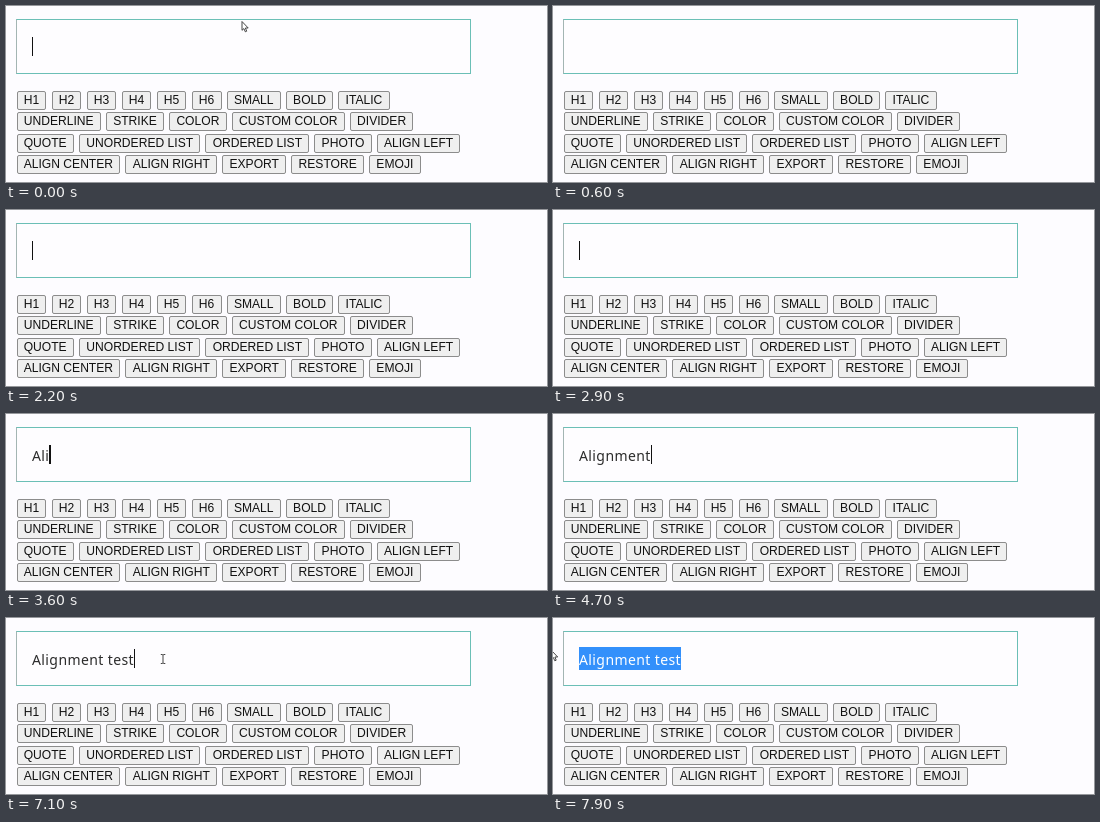
These frames come from a looping animation (541 px wide and 176 px high, 8 s). An HTML page:

```html
<!DOCTYPE html>
<html lang="en">
<head>
<meta charset="utf-8">
<title>Text editor</title>
<style>
  html, body { margin: 0; width: 100%; height: 100%; overflow: hidden; background: #fdfcff; }
  #stage { position: relative; width: 541px; height: 176px; overflow: hidden; }
  #stage > * { position: absolute; }
  #box { left: 10px; top: 13px; width: 453px; height: 53px; border: 1px solid #6bbfb6;
    border-left-color: #a3b5b3; background: #fefdff; }
  #line { left: 26px; top: 32px; color: #2c2c2c; white-space: pre;
    font: 14px/19px "Noto Sans", sans-serif; letter-spacing: .4px; }
  #mark { padding: 3px 0 1px; background: #3390fb; color: #fff; }
  #caret { position: absolute; top: -1px; width: 1.3px; height: 19px; background: #111; }
  .row { left: 10.5px; display: flex; gap: 5.2px; }
  .row span { box-sizing: border-box; height: 19px; padding: 0 6.2px; border: 1px solid #8c8c8c;
    border-radius: 2px; background: #efefef; color: #111; white-space: nowrap;
    font: 12.1px/17px "Liberation Sans", Arial, sans-serif; }
  svg { left: 0; top: 0; overflow: visible; }
</style>
</head>
<body>
<div id="stage">
  <div id="box"></div>
  <div id="line"><span id="plain"></span><span id="mark"></span><i id="caret"></i></div>
  <svg id="arrow" width="8" height="12">
    <path d="M.5 .5V9.3L2.4 7.6 3.8 10.8 5.2 10.2 3.9 7H6.7Z" fill="#fff" stroke="#333" stroke-width=".9"/>
  </svg>
  <svg id="beam" width="6" height="10">
    <path d="M.5 .5H2L2.7 1 3.4 .5H5M2.7 1V9M.5 9.5H2L2.7 9 3.4 9.5H5" fill="none" stroke="#444"/>
  </svg>
</div>
<script>
const $ = id => document.getElementById(id);
const LOOP = 8000, BLINK = 530, TEXT = "Alignment test";
const TYPE_START = 3250, KEY_GAP = 175;
const TYPE_END = TYPE_START + (TEXT.length - 1) * KEY_GAP;
const ROWS = [
  "H1,H2,H3,H4,H5,H6,SMALL,BOLD,ITALIC",
  "UNDERLINE,STRIKE,COLOR,CUSTOM COLOR,DIVIDER",
  "QUOTE,UNORDERED LIST,ORDERED LIST,PHOTO,ALIGN LEFT",
  "ALIGN CENTER,ALIGN RIGHT,EXPORT,RESTORE,EMOJI"
];

ROWS.forEach((names, i) => {
  const row = document.createElement("div");
  row.className = "row";
  row.style.top = 84.5 + 21.5 * i + "px";
  for (const name of names.split(",")) {
    row.appendChild(document.createElement("span")).textContent = name;
  }
  $("stage").appendChild(row);
});

// Pointer path: time, x, y
const PATH = [[6500, 236, 16], [6950, 157, 41], [7200, 157, 41], [7800, -2, 37]];

function pointer(t) {
  const i = PATH.findIndex(p => p[0] > t);
  if (i < 0) return PATH[PATH.length - 1].slice(1);
  const [t0, x0, y0] = PATH[i - 1], [t1, x1, y1] = PATH[i];
  const k = (t - t0) / (t1 - t0), e = k * k * (3 - 2 * k);
  return [x0 + (x1 - x0) * e, y0 + (y1 - y0) * e];
}

function place(el, show, x, y) {
  el.style.display = show ? "" : "none";
  el.style.transform = `translate(${x}px, ${y}px)`;
}

function draw(t) {
  const typed = Math.max(0, Math.min(TEXT.length, Math.floor((t - TYPE_START) / KEY_GAP) + 1));
  const moving = t >= PATH[0][0];
  const [x, y] = moving ? pointer(t) : [236, 20];
  const outside = x < 11;

  // Dragging left selects back from the end of the text
  const hit = Math.max(0, Math.min(TEXT.length, Math.round((x - 26) / 102 * TEXT.length)));
  const cut = t >= PATH[2][0] ? hit : typed;
  $("plain").textContent = TEXT.slice(0, cut);
  $("mark").textContent = TEXT.slice(cut, typed);

  const typing = t >= TYPE_START && t < TYPE_END;
  const phase = t < TYPE_START ? t + 370 : t - TYPE_END;
  const lit = typing || phase % (2 * BLINK) < BLINK;
  $("caret").style.display = lit && cut === typed ? "" : "none";

  place($("arrow"), t < 100 || moving && outside, moving ? x : 235.5, moving ? y - 5 : 15);
  place($("beam"), moving && !outside, x - 2.7, y - 5);
}

function tick() {
  draw(performance.now() % LOOP);
  requestAnimationFrame(tick);
}
tick();
</script>
</body>
</html>
```
